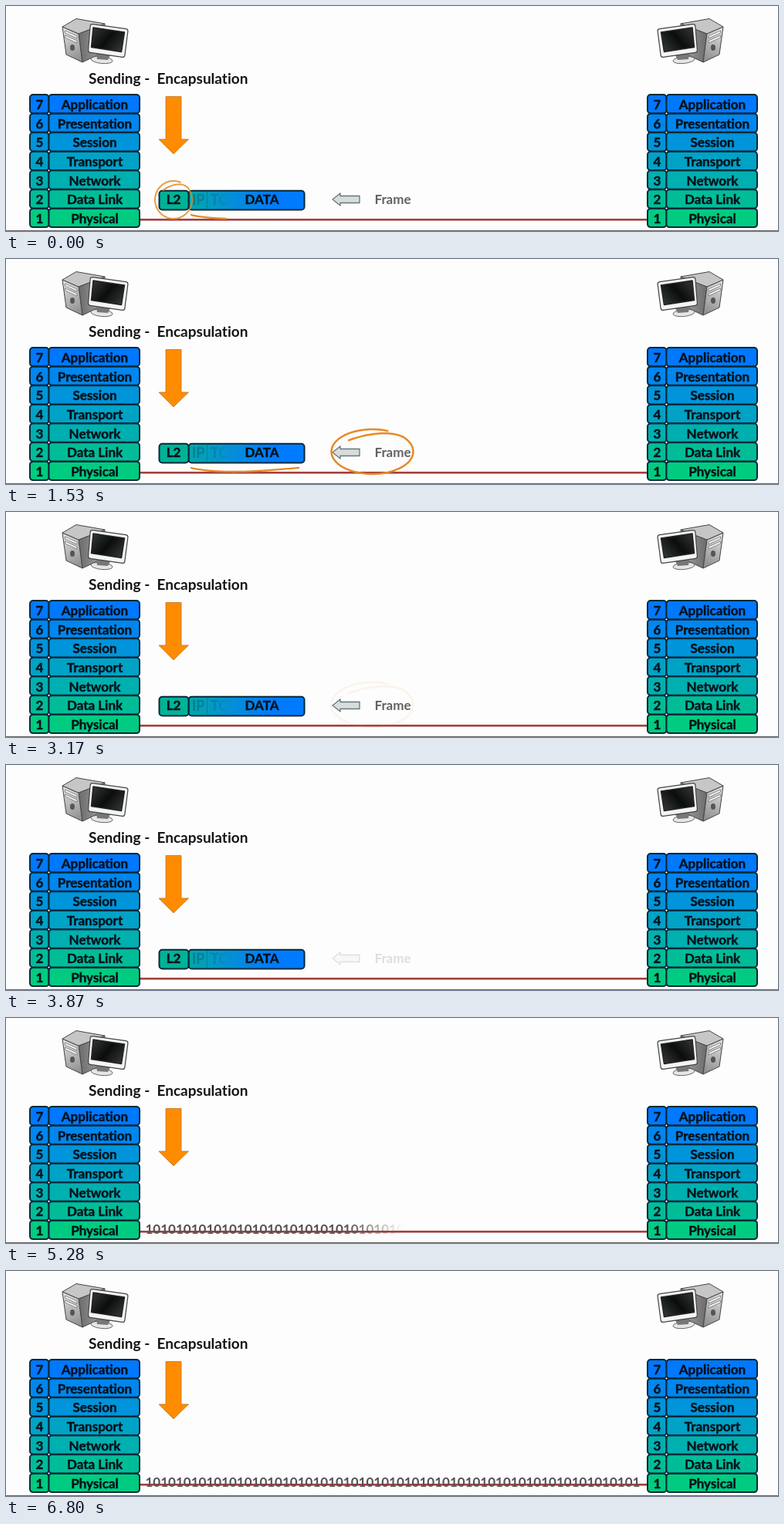
An HTML page with a canvas for the animation above (6.9 s loop, 1000x292 px).

```html
<!DOCTYPE html>
<html lang="en">
<head>
<meta charset="utf-8">
<title>Encapsulation</title>
<style>
html, body { margin: 0; width: 100%; height: 100%; overflow: hidden; background: #fdfdfd; }
canvas { display: block; }
</style>
</head>
<body>
<canvas id="stage" width="1000" height="292"></canvas>
<script>
const LOOP = 6900;
const INK = '#e58a26';
const EDGE = '#06293a';
const LAYERS = ['Application', 'Presentation', 'Session', 'Transport', 'Network', 'Data Link', 'Physical'];
const BITS = '10'.repeat(32) + '1';

const stage = document.getElementById('stage').getContext('2d');

function makeLayer() {
  const canvas = document.createElement('canvas');
  canvas.width = 1000;
  canvas.height = 292;
  return canvas.getContext('2d');
}

const clamp = v => Math.max(0, Math.min(1, v));
const ramp = (t, from, to) => clamp((t - from) / (to - from));
const mix = (a, b, p) => a + (b - a) * p;

function text(c, str, x, y, size, color, align = 'left') {
  c.font = `700 ${size}px Lato, Inter, sans-serif`;
  c.textRendering = 'optimizeSpeed'; // no kerning or ligatures
  c.textAlign = align;
  c.fillStyle = color;
  c.fillText(str, x, y);
}

// Slightly heavier centred label, as used inside the boxes.
function label(c, str, x, y) {
  const color = '#04121a';
  text(c, str, x, y, 17, color, 'center');
  c.strokeStyle = color;
  c.lineWidth = 0.45;
  c.strokeText(str, x, y);
}

function box(c, x, y, w, h, fill, radius = 4) {
  c.beginPath();
  c.roundRect(x, y, w, h, radius);
  c.fillStyle = fill;
  c.fill();
  c.strokeStyle = EDGE;
  c.lineWidth = 2;
  c.stroke();
}

function poly(c, points, fill, stroke, width = 1) {
  c.beginPath();
  points.forEach(([x, y]) => c.lineTo(x, y));
  c.closePath();
  c.fillStyle = fill;
  c.fill();
  if (!stroke) return;
  c.strokeStyle = stroke;
  c.lineWidth = width;
  c.lineJoin = 'round';
  c.stroke();
}

function gradient(c, x0, y0, x1, y1, ...colors) {
  const g = c.createLinearGradient(x0, y0, x1, y1);
  colors.forEach((color, i) => g.addColorStop(i / (colors.length - 1), color));
  return g;
}

function drawStack(c, x) {
  LAYERS.forEach((name, i) => {
    const p = i / 6;
    const y = 115 + i * 24.65;
    const fill = `rgb(0,${mix(120, 203, p)},${mix(255, 128, p ** 1.15)})`;
    box(c, x + 1, y, 24.5, 24.2, fill);
    box(c, x + 25.5, y, 117.5, 24.2, fill);
    label(c, 7 - i, x + 13.5, y + 19);
    label(c, name, x + 85, y + 19);
  });
}

function drawComputer(c) {
  const line = '#444';
  poly(c, [[94, 36], [128, 23], [126, 60], [99, 73]], gradient(c, 94, 0, 126, 0, '#6b6b6b', '#a2a2a2'), line);
  poly(c, [[73, 27], [94, 36], [99, 73], [78, 63]], gradient(c, 73, 27, 98, 70, '#e4e4e4', '#8d8d8d'), line);
  poly(c, [[73, 27], [91, 16.5], [128, 23], [94, 36]], '#c6c6c6', line);
  for (const y of [33, 39]) {
    poly(c, [[76.5, y - 1], [92, y + 6], [92, y + 9], [76.5, y + 2]], '#f2f2f2', '#777', 0.8);
  }
  c.fillStyle = '#555';
  c.beginPath();
  c.ellipse(86, 54, 3, 4, 0, 0, 7);
  c.fill();

  c.beginPath();
  c.ellipse(124, 70, 14, 4.5, 0.1, 0, 7);
  c.fillStyle = '#e6e6e6';
  c.fill();
  c.strokeStyle = line;
  c.stroke();
  poly(c, [[117, 60], [136, 62], [132, 70], [118, 69]], '#777');

  // Stroking twice gives the bezel rounded corners with a dark rim.
  const bezel = [[112, 26.5], [155, 32.5], [151, 63.5], [109.5, 57.5]];
  poly(c, bezel, '#f4f4f4', line, 7);
  poly(c, bezel, '#f4f4f4', '#f4f4f4', 4.6);
  poly(c, [[113, 28], [153.5, 34], [149.5, 59.5], [110.5, 53.5]],
    gradient(c, 112, 28, 150, 60, '#343737', '#0b0d0d', '#353939'), '#222', 1.5);
}

function drawScene(c) {
  c.fillStyle = '#fdfdfd';
  c.fillRect(0, 0, 1000, 292);
  c.fillStyle = '#666';
  c.fillRect(0, 291, 1000, 1);
  c.fillStyle = '#a5403d';
  c.fillRect(174, 276, 657, 2.6);

  drawComputer(c);
  c.save();
  c.translate(1002, 0);
  c.scale(-1, 1);
  drawComputer(c);
  c.restore();

  text(c, 'Sending -', 107, 101, 19, '#151515');
  text(c, 'Encapsulation', 195.5, 101, 19, '#151515');
  poly(c, [[207, 117.5], [227, 117.5], [227, 173], [236.5, 173], [217, 192], [198, 173], [207, 173]],
    '#ff8c00', '#bd7424', 0.8);
  drawStack(c, 30);
  drawStack(c, 830);
}

function drawPacket(c) {
  box(c, 236.5, 239.8, 150, 24.6, gradient(c, 237, 0, 345, 0, '#00a7a9', '#058fd6', '#007bff'));
  box(c, 198.5, 239.8, 38, 24.6, '#00b296');
  label(c, 'L2', 217, 257);
  const faint = gradient(c, 240, 0, 294, 0, 'rgba(0,70,90,.42)', 'rgba(0,70,110,.3)', 'rgba(0,80,150,0)');
  text(c, 'IP', 241, 258, 18, faint);
  text(c, 'TCP', 265, 258, 18, faint);
  c.fillStyle = 'rgba(0,70,90,.3)';
  c.fillRect(260, 241, 1, 22);
  label(c, 'DATA', 331.5, 257);
}

const scene = makeLayer();
const packet = makeLayer();
const scratch = makeLayer();
drawScene(scene);
drawPacket(packet);

function drawPacketExit(t) {
  if (t < 4390) {
    stage.drawImage(packet.canvas, 0, 0);
    return;
  }
  const k = 1.9 * (1 - ramp(t, 4390, 4980));
  if (!k) return;
  const c = scratch;
  c.clearRect(0, 0, 1000, 292);
  c.drawImage(packet.canvas, 0, 0);
  c.save();
  c.globalCompositeOperation = 'destination-in';
  c.filter = 'blur(2.2px)';
  c.translate(255, 275);
  c.scale(k, k);
  c.beginPath();
  c.moveTo(-62, 0);
  c.bezierCurveTo(-55, -24, -42, -37, 0, -40);
  c.bezierCurveTo(45, -40, 75, -28, 140, -8);
  c.lineTo(140, 0);
  c.fill();
  c.restore();
  stage.drawImage(c.canvas, 0, 0);
}

function trace(point, progress, alpha, width) {
  if (progress <= 0 || alpha <= 0) return;
  stage.save();
  stage.globalAlpha = alpha;
  stage.strokeStyle = INK;
  stage.lineWidth = width;
  stage.lineCap = stage.lineJoin = 'round';
  stage.beginPath();
  for (let i = 0; i <= 80; i++) stage.lineTo(...point(i / 80 * progress));
  stage.stroke();
  stage.restore();
}

// Hand-drawn loop that starts inside its own outline and overlaps its end.
const loopAround = (x, y, rx, ry) => p => {
  const a = (-125 + 417 * p) * Math.PI / 180;
  const inset = mix(0.62, 1, clamp(p / 0.2));
  return [x + rx * Math.cos(a), y + ry * inset * Math.sin(a)];
};

const underline = p => [240 + 139 * p, 271 + 5 * Math.sin(Math.PI * Math.pow(p, 0.75))];

function drawInk(t) {
  trace(loopAround(217, 251.5, 24, 24.5), 1, 0.85 * (1 - ramp(t, 0, 500)), 2);
  trace(underline, mix(0.32, 1, ramp(t, 0, 500)), 1 - ramp(t, 1900, 2900), 2.3);
  trace(loopAround(474.5, 250, 53, 29), ramp(t, 750, 1450), 1 - ramp(t, 2350, 3250), 2.5);
}

function drawFrameLabel(t) {
  const alpha = 1 - ramp(t, 3350, 4000);
  if (!alpha) return;
  stage.save();
  stage.globalAlpha = alpha;
  poly(stage, [[423, 251], [433, 243], [433, 246.5], [458, 246.5], [458, 255.5], [433, 255.5], [433, 259]],
    '#d9dcdc', '#63777b', 1.3);
  text(stage, 'Frame', 501, 256.5, 17, '#626262', 'center');
  stage.restore();
}

function drawBits(t) {
  const front = 180 + (t - 4615) * 0.502;
  if (front <= 180) return;
  const fade = gradient(stage, front - 75, 0, front, 0, 'rgba(82,82,82,1)', 'rgba(82,82,82,0)');
  text(stage, BITS, 180.5, 280, 17, fade);
}

function render(t) {
  stage.drawImage(scene.canvas, 0, 0);
  drawPacketExit(t);
  drawFrameLabel(t);
  drawInk(t);
  drawBits(t);
}

const start = performance.now();
function tick() {
  render((performance.now() - start) % LOOP);
  requestAnimationFrame(tick);
}
tick();
</script>
</body>
</html>
```
